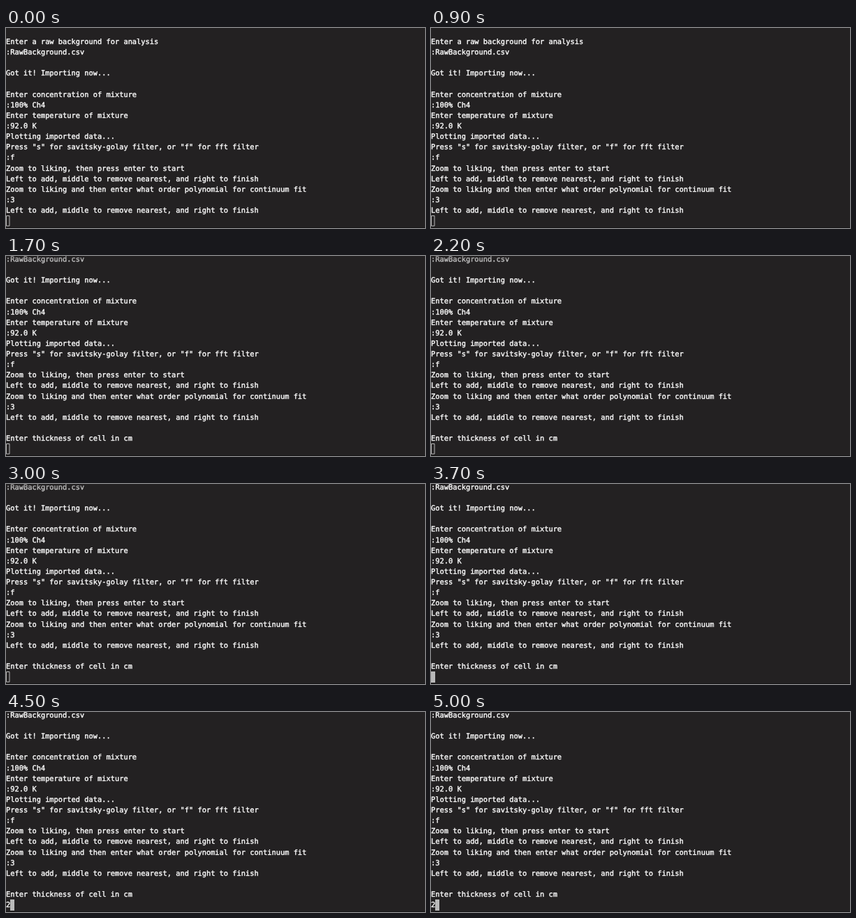
Recreate the animation shown at these times as an HTML page with a canvas. Size 600x287 px, loop 5.1 s.

```html
<!DOCTYPE html>
<html lang="en">
<head>
<meta charset="utf-8">
<title>Terminal session</title>
<style>
  html, body { margin: 0; width: 100%; height: 100%; overflow: hidden; background: #232122; }
  canvas { display: block; }
</style>
</head>
<body>
<canvas id="screen" width="600" height="287"></canvas>
<script>
const LOOP = 5100;
const SCROLL_AT = 1100, FOCUS_AT = 3600, TYPE_AT = 4400;
const FONT_SIZE = 10.37, LINE_HEIGHT = 15.13, PROMPT_TOP = 269, BASELINE = 11.2;
const BACKGROUND = "#232122", TEXT = "#fbfbfb", CURSOR = "#b9b9b9";

const history = `Enter a raw background for analysis
:RawBackground.csv

Got it! Importing now...

Enter concentration of mixture
:100% Ch4
Enter temperature of mixture
:92.0 K
Plotting imported data...
Press "s" for savitsky-golay filter, or "f" for fft filter
:f
Zoom to liking, then press enter to start
Left to add, middle to remove nearest, and right to finish
Zoom to liking and then enter what order polynomial for continuum fit
:3
Left to add, middle to remove nearest, and right to finish`.split("\n");
const question = ["", "Enter thickness of cell in cm"];

const ctx = document.getElementById("screen").getContext("2d");
ctx.font = `${FONT_SIZE}px "DejaVu Sans Mono", monospace`;
ctx.textRendering = "geometricPrecision";
ctx.lineJoin = "round";

// Text fades into the top edge while the terminal is in the background
const fade = ctx.createLinearGradient(0, 0, 0, 14);
fade.addColorStop(0, "rgba(35, 33, 34, 0.5)");
fade.addColorStop(1, "rgba(35, 33, 34, 0)");

// A thin outline gives the text its slightly heavier weight
function drawLine(line, y) {
  ctx.fillStyle = ctx.strokeStyle = TEXT;
  ctx.lineWidth = 0.4;
  ctx.fillText(line, 0, y);
  ctx.strokeText(line, 0, y);
}

function drawCursor(x, focused) {
  ctx.fillStyle = ctx.strokeStyle = CURSOR;
  ctx.lineWidth = 1;
  if (focused) ctx.fillRect(x, PROMPT_TOP, 6, 16);
  else ctx.strokeRect(x + 0.5, PROMPT_TOP + 0.5, 4.5, 14.5);
}

function draw(time) {
  const focused = time >= FOCUS_AT;
  const input = time >= TYPE_AT ? "2" : "";
  const lines = [...history, ...(time >= SCROLL_AT ? question : []), input];

  ctx.fillStyle = BACKGROUND;
  ctx.fillRect(0, 0, 600, 287);
  lines.forEach((line, i) => {
    const rowsUp = lines.length - 1 - i;
    drawLine(line, PROMPT_TOP + BASELINE - rowsUp * LINE_HEIGHT);
  });
  drawCursor(Math.round(ctx.measureText(input).width), focused);

  if (!focused) {
    ctx.fillStyle = fade;
    ctx.fillRect(0, 0, 600, 14);
  }
  ctx.fillStyle = "#161516";
  ctx.fillRect(0, 286, 600, 1);
}

const start = performance.now();
function tick() {
  draw((performance.now() - start) % LOOP);
  requestAnimationFrame(tick);
}
tick();
</script>
</body>
</html>
```
